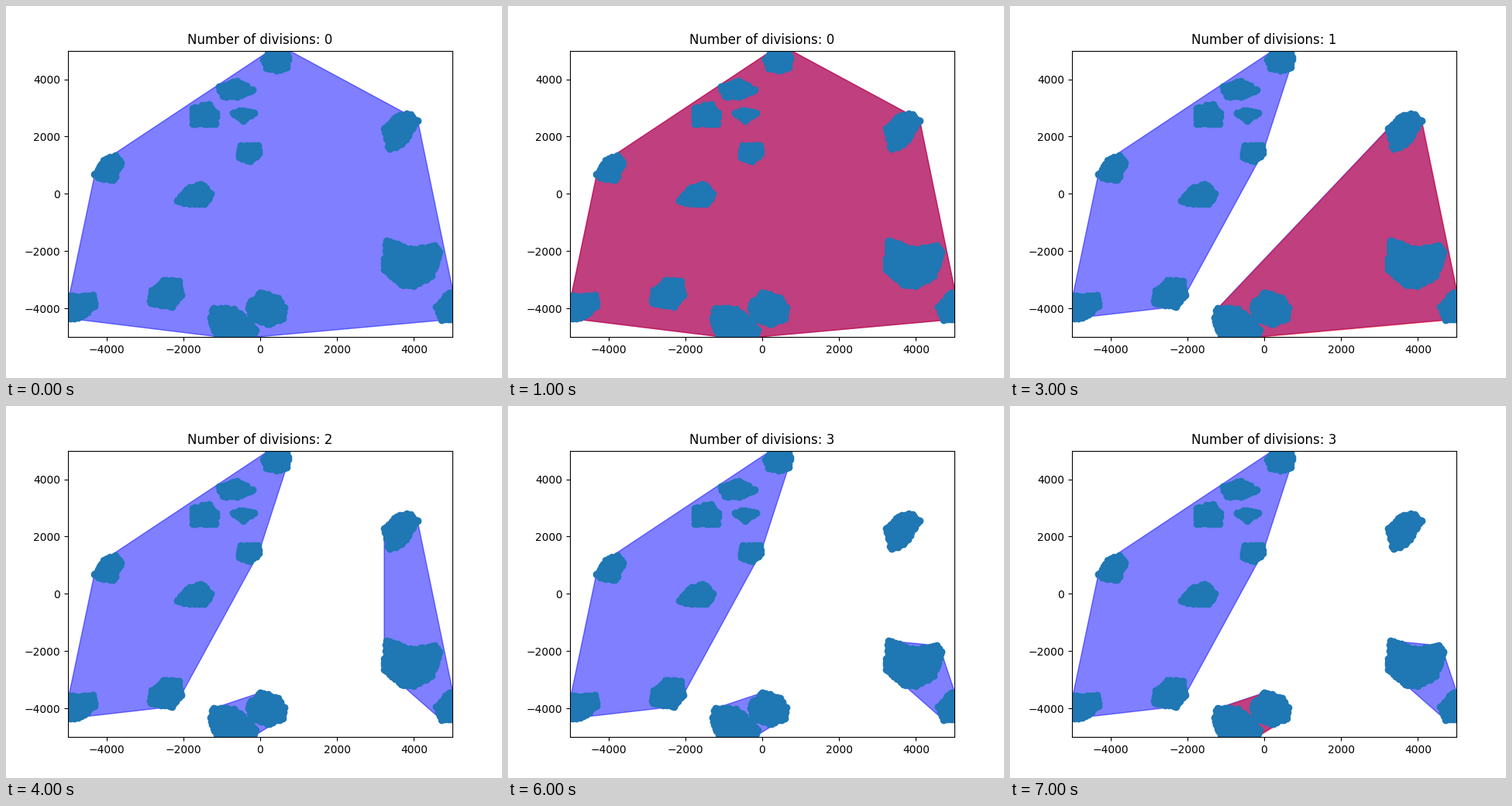
A matplotlib script for the animation above (8000 ms loop, 640 by 480 pixels).

```python
import numpy as np
import matplotlib.pyplot as plt
from matplotlib.animation import FuncAnimation
from matplotlib.collections import PolyCollection

DOT = "#1f77b4"
SPACING, JITTER = 5, 1.2
rng = np.random.default_rng(4)

fig, ax = plt.subplots(figsize=(6.4, 4.8), dpi=100)
ax.set_xlim(-5000, 5000)
ax.set_ylim(-5000, 5000)
title = ax.set_title("Number of divisions: 0")


def to_data(points):
    """Stage pixels to axes units."""
    x, y = np.asarray(points, float).T
    return np.column_stack([(x - 328) / 0.0496, (242.4 - y) / 0.03696])


def blob(*corners):
    """Draw a cluster of dots with a ragged rim and return its corners."""
    ring = np.array(corners, float)
    dots = []
    for p, q in zip(ring, np.roll(ring, -1, axis=0)):
        n = int(np.ceil(np.hypot(*(q - p)) / SPACING))
        dots.append(p)
        dots += [p + (q - p) * k / n + rng.uniform(-JITTER, JITTER, 2)
                 for k in range(1, n)]
    ax.fill(*to_data(ring).T, color=DOT, zorder=2)
    ax.scatter(*to_data(dots).T, color=DOT, zorder=2)
    return ring


def turns_left(a, b, c):
    return (b[0] - a[0]) * (c[1] - a[1]) > (b[1] - a[1]) * (c[0] - a[0])


def half_hull(points):
    out = []
    for p in points:
        while len(out) > 1 and not turns_left(out[-2], out[-1], p):
            out.pop()
        out.append(p)
    return out[:-1]


def hull(blobs):
    """Convex hull of all corners by monotone chain."""
    points = sorted(map(tuple, np.vstack(blobs)))
    return to_data(half_hull(points) + half_hull(points[::-1]))


left = [
    blob((332, 69), (336, 80), (349, 83), (362, 79), (363, 56), (349, 51)),
    blob((275, 104), (298, 97), (318, 108), (298, 117), (280, 116)),
    blob((241, 132), (262, 127), (271, 138), (270, 152), (241, 152)),
    blob((293, 138), (306, 135), (320, 138), (306, 148)),
    blob((303, 180), (325, 180), (326, 190), (315, 200), (301, 195)),
    blob((114, 217), (126, 199), (141, 193), (148, 202), (138, 224),
         (123, 222)),
    blob((221, 251), (233, 237), (251, 230), (264, 242), (256, 255),
         (233, 254)),
    blob((187, 383), (188, 367), (203, 354), (223, 355), (226, 373),
         (214, 388)),
    blob((76, 398), (82, 374), (112, 373), (114, 387), (97, 400), (83, 403)),
]
bottom = [
    blob((264, 402), (268, 390), (294, 391), (322, 418), (318, 427),
         (287, 428), (272, 424)),
    blob((328, 370), (351, 377), (359, 389), (357, 403), (337, 410),
         (315, 403), (314, 385)),
]
upper_right = [
    blob((488, 158), (504, 143), (517, 139), (531, 148), (510, 178),
         (495, 184)),
]
lower_right = [
    blob((491, 303), (525, 315), (553, 309), (559, 317), (549, 348),
         (526, 361), (510, 359), (488, 340)),
    blob((555, 388), (571, 371), (577, 371), (580, 402), (562, 405)),
]
right = upper_right + lower_right

# Groups after each division; the last one is picked for the next split.
STAGES = [
    [left + right + bottom],
    [left, right + bottom],
    [left, bottom, right],
    [left, upper_right, lower_right, bottom],
]
HULLS = [[hull(group) for group in stage] for stage in STAGES]

# The picked group gets a red layer over its blue one.
areas = PolyCollection([], color="blue", alpha=0.5, lw=1, zorder=1)
picked = PolyCollection([], color="red", alpha=0.5, lw=1, zorder=1)
for layer in (areas, picked):
    ax.add_collection(layer, autolim=False)


def update(frame):
    step, pick = divmod(frame, 2)
    areas.set_verts(HULLS[step])
    picked.set_verts(HULLS[step][-1:] if pick else [])
    title.set_text(f"Number of divisions: {step}")
    return areas, picked, title


anim = FuncAnimation(fig, update, frames=8, interval=1000, repeat=True)
plt.show()
```
